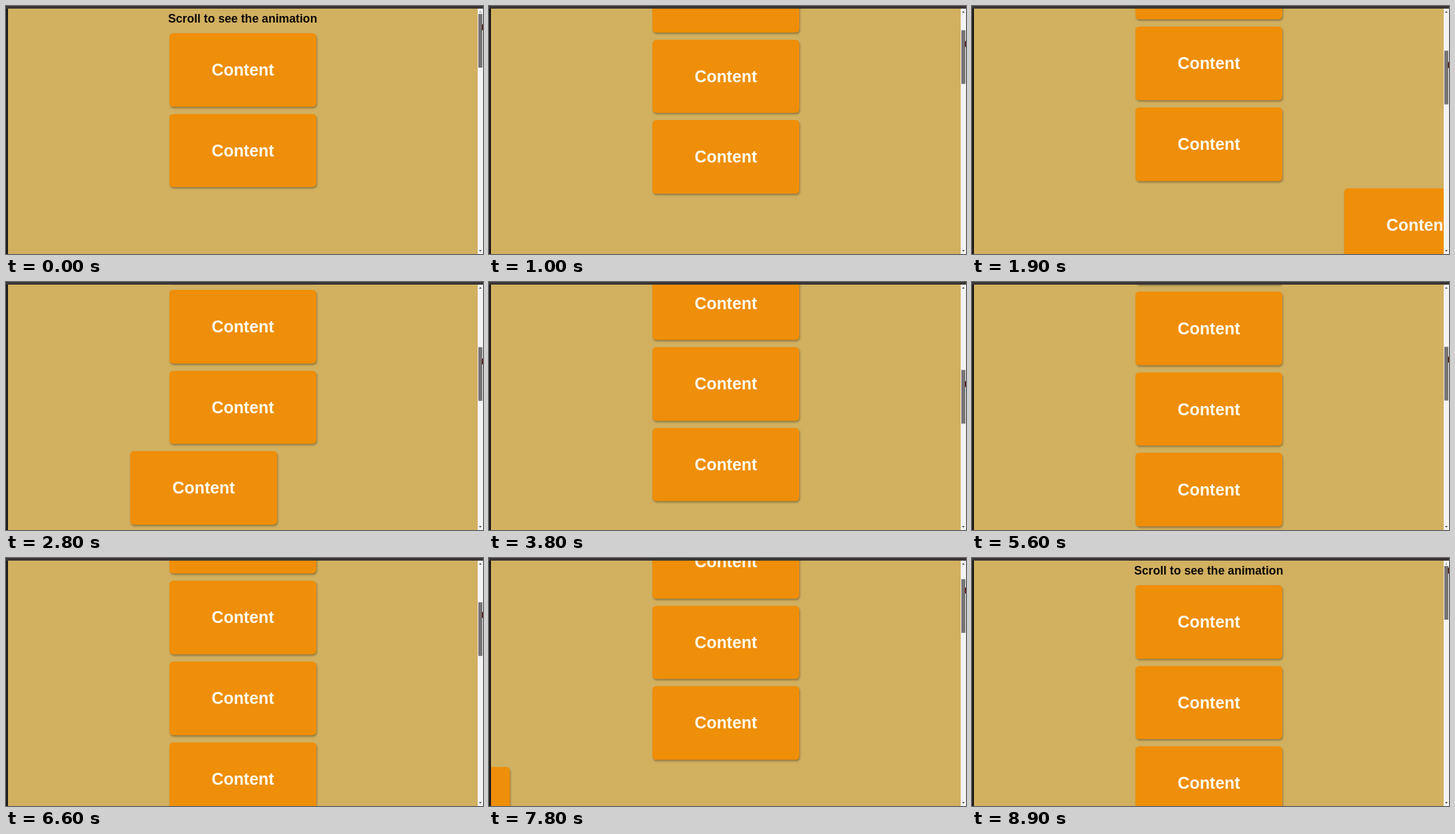
These frames come from a looping animation (718x374 px, 9 s). An HTML page:

```html
<!DOCTYPE html>
<html lang="en">
<head>
<meta charset="utf-8">
<title>Scroll animation</title>
<style>
  html, body { margin: 0; width: 100%; height: 100%; overflow: hidden; }
  body { position: relative; background: #1d1b1a; font-family: "Liberation Sans", Arial, sans-serif; font-weight: bold; }
  body > *, .page *, .bar * { position: absolute; }
  .top { left: 0; top: 0; width: 718px; height: 3.5px; background: #3a3534; }
  .page { left: 2.5px; top: 3.5px; width: 707.5px; height: 370.5px; overflow: hidden; background: #d1b060; }
  .scroll { left: -2.5px; top: -3.5px; width: 718px; height: 0; }
  h1 { margin: 0; left: 56.2px; top: 9.4px; width: 600px; line-height: 20px; font-size: 17.65px; text-align: center; color: #0c0805; }
  .card {
    left: 245.9px; width: 221.2px; height: 110.6px; line-height: 110.6px;
    border-radius: 5.5px; background: #ef8e08; box-shadow: 1.1px 2.2px 2.8px rgba(0, 0, 0, .3);
    font-size: 24.9px; text-align: center; color: #fffdf0;
  }
  .bar { left: 710px; top: 3.5px; width: 8px; height: 370.5px; background: #f3f3f3; overflow: hidden; }
  .thumb { left: 1px; top: 8.5px; width: 6px; height: 81px; background: #767474; }
  .arrow { left: 2px; width: 4px; height: 2.5px; background: #4a4848; }
  .up { top: 4px; clip-path: polygon(50% 0, 100% 100%, 0 100%); }
  .down { top: 364.5px; clip-path: polygon(0 0, 100% 0, 50% 100%); }
  .pointer { left: 6.3px; top: -3.5px; width: 1.7px; height: 10px; background: #541b14; clip-path: polygon(100% 0, 100% 100%, 0 85%, 0 15%); }
</style>
</head>
<body>
<div class="page"><div class="scroll"><h1>Scroll to see the animation</h1></div></div>
<div class="bar">
  <div class="arrow up"></div>
  <div class="thumb"></div>
  <div class="arrow down"></div>
  <div class="pointer"></div>
</div>
<div class="top"></div>
<script>
  const LOOP = 9000, STEP = 100;
  const FIRST_TOP = 41, PITCH = 121.65, CARDS = 7;
  const REVEAL_LINE = 299.5, SLIDE = 400, ENTER_LAG = 9, LEAVE_LAG = 3;

  // [time, position]
  const scrollPath = [[0, 0], [286, 0], [1900, 253], [3800, 550.75], [3985, 580], [4230, 580],
    [5600, 391.5], [6600, 249.8], [7800, 90.7], [8490, 0], [LOOP, 0]];
  const pointerPath = [[0, 27], [286, 27], [1900, 84], [3800, 149], [3985, 155], [4230, 155],
    [5600, 112], [6600, 81], [7800, 44], [8490, 22], [8900, 14], [LOOP, 14]];

  const animations = [];
  const find = selector => document.querySelector(selector);

  function play(el, frames) {
    const animation = el.animate(frames, { duration: LOOP, fill: "both" });
    animation.pause();
    animations.push(animation);
  }

  function moveY(el, path, factor) {
    play(el, path.map(([t, v]) => ({ offset: t / LOOP, transform: `translateY(${v * factor}px)` })));
  }

  // Time at which the scroll passes a level, going down (1) or back up (-1)
  function crossing(level, dir) {
    for (let i = 1; i < scrollPath.length; i++) {
      const [t0, a] = scrollPath[i - 1], [t1, b] = scrollPath[i];
      if ((b - a) * dir > 0 && (level - a) * (level - b) <= 0) {
        return t0 + (t1 - t0) * (level - a) / (b - a);
      }
    }
  }

  function slide(el, top, side) {
    const level = Math.max(0, top - REVEAL_LINE);
    const away = `translateX(${side * 400}%)`, home = "translateX(0%)";
    const key = (t, transform, easing = "linear") => ({ offset: t / LOOP, transform, easing });
    const enter = crossing(level, 1) + ENTER_LAG;
    const frames = [key(0, away), key(enter, away, "ease"), key(enter + SLIDE, home)];
    if (level > 0) {
      const leave = crossing(level, -1) + LEAVE_LAG;
      frames.push(key(leave, home, "ease"), key(leave + SLIDE, away), key(LOOP, away));
    } else {
      frames.push(key(LOOP, home));
    }
    play(el, frames);
  }

  for (let i = 0; i < CARDS; i++) {
    const card = document.createElement("div");
    const top = FIRST_TOP + i * PITCH;
    card.className = "card";
    card.textContent = "Content";
    card.style.top = top + "px";
    find(".scroll").append(card);
    if (i > 1) slide(card, top, i % 2 ? -1 : 1);
  }

  moveY(find(".scroll"), scrollPath, -1);
  moveY(find(".thumb"), scrollPath, 0.219);
  moveY(find(".pointer"), pointerPath, 1);

  // The up arrow is dimmed while the page is at its top
  const dim = (t, opacity) => ({ offset: t / LOOP, opacity, easing: "step-end" });
  play(find(".up"), [dim(0, 0.45), dim(286, 1), dim(8490, 0.45), dim(LOOP, 0.45)]);

  const start = performance.now();
  function tick() {
    const elapsed = performance.now() - start + 5;
    const time = Math.floor(elapsed / STEP) * STEP % LOOP;
    for (const animation of animations) animation.currentTime = time;
    requestAnimationFrame(tick);
  }
  tick();
</script>
</body>
</html>
```
